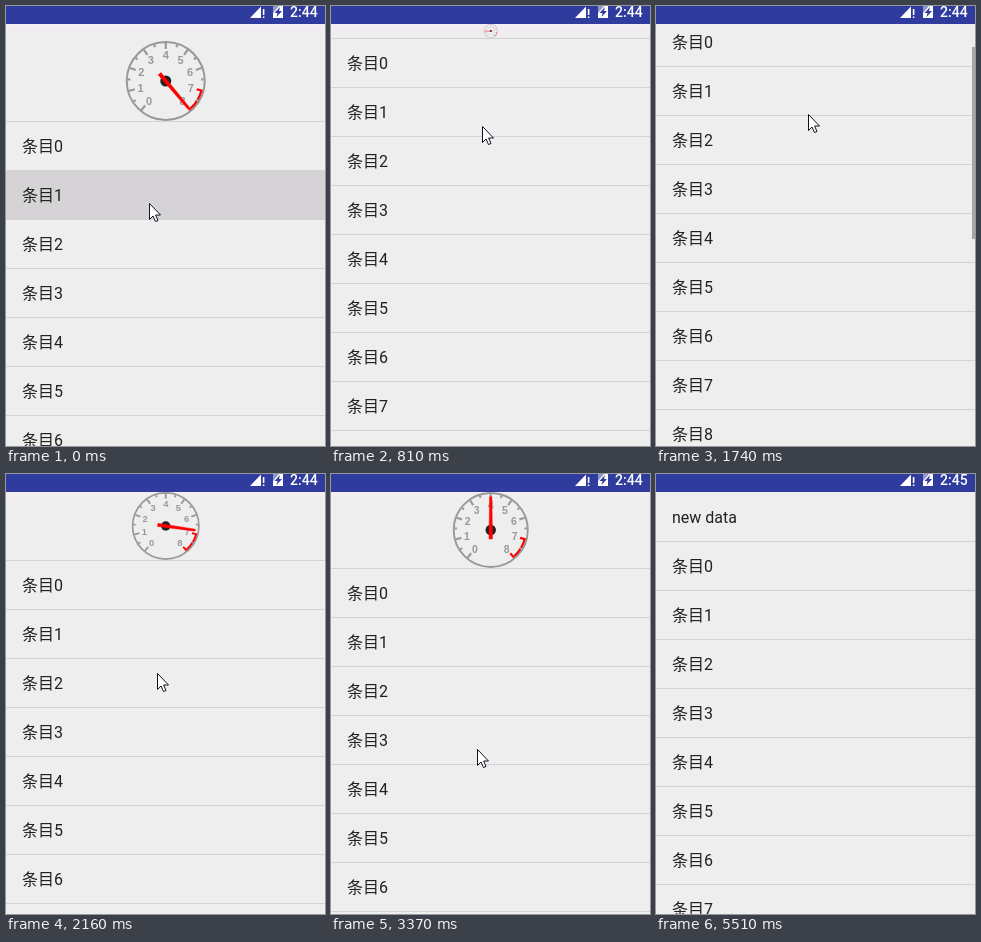
These frames come from a looping animation (319x440 px, 6.37 s). An HTML page:

```html
<!DOCTYPE html>
<html lang="zh">
<head>
<meta charset="utf-8">
<title>Pull to refresh</title>
<style>
  html, body { margin: 0; width: 100%; height: 100%; overflow: hidden; background: #eee; }
  svg { display: block; width: 100%; height: 100%; }
  text { font-family: Roboto, "Noto Sans CJK SC", "Noto Sans CJK", sans-serif; }
  #list text { font-size: 16px; fill: #212121; }
  #list rect { fill: #d3d3d3; }
  #list #press { fill: #d5d3d6; }
  #dial text { font: bold 11px "Liberation Sans", Arial, sans-serif; fill: #999; text-anchor: middle; }
  #clock { font-size: 14px; font-weight: 500; fill: #fff; }
</style>
</head>
<body>
<svg viewBox="0 0 319 440">
  <defs>
    <linearGradient id="glow" x2="0" y2="1">
      <stop offset="0" stop-color="#f5eef6"/>
      <stop offset="1" stop-color="#eee"/>
    </linearGradient>
  </defs>
  <rect width="319" height="440" fill="#eee"/>
  <rect id="edge" y="18" width="319" height="7" fill="url(#glow)"/>
  <g id="list"><rect id="press" y="49" width="319" height="50"/></g>
  <g id="gauge">
    <g id="dial" stroke-width="2.2" fill="none">
      <circle r="39" stroke="#999" stroke-width="2"/>
    </g>
    <circle r="5.5" fill="#222"/>
    <path id="needle" d="M-1.8 9.5 L-1.2 -35 H1.2 L1.8 9.5Z" fill="#f00" stroke="#f00" stroke-width=".5"/>
  </g>
  <rect id="bar" x="316" width="3" height="192" fill="#a6a6a6"/>
  <g id="status">
    <rect width="319" height="18" fill="#303c9d"/>
    <path d="M244 12 L255 .5 V12Z M256.8 3 h1.6 v6 h-1.6z M256.8 10.4 h1.6 v1.6 h-1.6z" fill="#fff"/>
    <path d="M267 0 H277 V12 H267Z" fill="#fff"/>
    <path d="M267 0 H273 L267 7Z" fill="#8f98cc"/>
    <path d="M274 1 L268.5 7 H271.5 L270.5 11 L276 5 H273Z" fill="#303c9d"/>
    <text id="clock" x="284" y="11">2:44</text>
  </g>
  <path id="cursor" d="M.5 .5 V16.5 L4 13 L6.5 18.5 L9 17.5 L6.6 12 H11.5Z" fill="#fff" stroke="#112"/>
</svg>
<script>
const LOOP = 6370, STEP = 4750 / 35, TOP = 18, ROW = 49, SPAN = 140;
const SPIN = 20, DONE = 35, LEAVE = 37, CLOSE = 5510;
const $ = id => document.getElementById(id);

// The drag: step, header height, pointer x, pointer y
const drag = [
  [0, 97, 143, 197], [3, 38, 149, 142], [9, -10, 153, 98], [11.5, -45, 153, 62],
  [16, 68, 151, 199], [19, 106, 146, 275], [21, 76, 146, 275]
];

function dragAt(n) {
  const i = drag.findIndex(p => p[0] > n);
  if (i < 0) return drag[drag.length - 1].slice(1);
  const a = drag[i - 1], b = drag[i], u = (n - a[0]) / (b[0] - a[0]);
  return a.map((v, k) => Math.round(v + (b[k] - v) * u)).slice(1);
}

// Needle sweeping evenly between both ends of the dial
function swing(n) {
  const u = ((n - 19.6) / 7.2) % 1;
  return SPAN * (4 * Math.abs(u - 0.5) - 1);
}

function add(parent, name, attrs, label) {
  const el = document.createElementNS("http://www.w3.org/2000/svg", name);
  for (const key in attrs) el.setAttribute(key, attrs[key]);
  if (label !== undefined) el.textContent = label;
  $(parent).append(el);
}

const move = (id, x, y, extra = "") => $(id).setAttribute("transform", `translate(${x} ${y}) ${extra}`);
const show = (id, on) => $(id).setAttribute("visibility", on ? "visible" : "hidden");

function polar(value, r) {
  const a = (value / 4 - 1) * SPAN * Math.PI / 180;
  return [r * Math.sin(a), -r * Math.cos(a)];
}

function buildList() {
  for (let i = 0; i < 12; i++) {
    add("list", "rect", { y: i * ROW, width: 319, height: 1 });
    add("list", "text", { x: 16, y: i * ROW + 31 }, "条目" + i);
  }
  add("list", "text", { id: "fresh", x: 16, y: 31 - ROW }, "new data");
}

function buildDial() {
  for (let v = 0; v <= 8; v += 0.5) {
    const whole = v % 1 === 0;
    add("dial", "path", {
      d: `M${polar(v, 38)} L${polar(v, whole ? 32 : 35.5)}`,
      stroke: whole && v >= 7 ? "#f00" : "#999"
    });
    if (whole) {
      const [x, y] = polar(v, 26);
      add("dial", "text", { x, y: y + 4 }, v);
    }
  }
  add("dial", "path", {
    d: `M${polar(7, 37)} A37 37 0 0 1 ${polar(8, 37)}`, stroke: "#f00", "stroke-dasharray": "10 1.5"
  });
}

function draw(t) {
  const n = Math.floor(t / STEP + 0.25);
  const [h, x, y] = dragAt(n), done = n >= DONE;
  const size = Math.max(0, Math.min(h, 80));
  const angle = n < SPIN ? (size / 40 - 1) * SPAN : swing(n);

  move("list", 0, TOP + (done ? ROW : h));
  show("press", n < 6);
  show("fresh", done);
  show("edge", h > 0 && !done);

  show("gauge", size > 1 && !done);
  move("gauge", 159.75, TOP + h - size / 2, `scale(${size / 80})`);
  $("needle").setAttribute("transform", `rotate(${angle})`);

  show("bar", h < 0);
  $("bar").setAttribute("y", Math.round(TOP + 20 - h * 0.4));

  const away = Math.max(0, (n - LEAVE) / 3) ** 1.5;
  move("cursor", Math.round(x + 102 * away), Math.round(y + 143 * away));
  show("cursor", t < CLOSE);
  $("clock").textContent = t < CLOSE ? "2:44" : "2:45";
}

buildList();
buildDial();
const start = performance.now();

function frame() {
  draw((performance.now() - start) % LOOP);
  requestAnimationFrame(frame);
}
frame();
</script>
</body>
</html>
```
